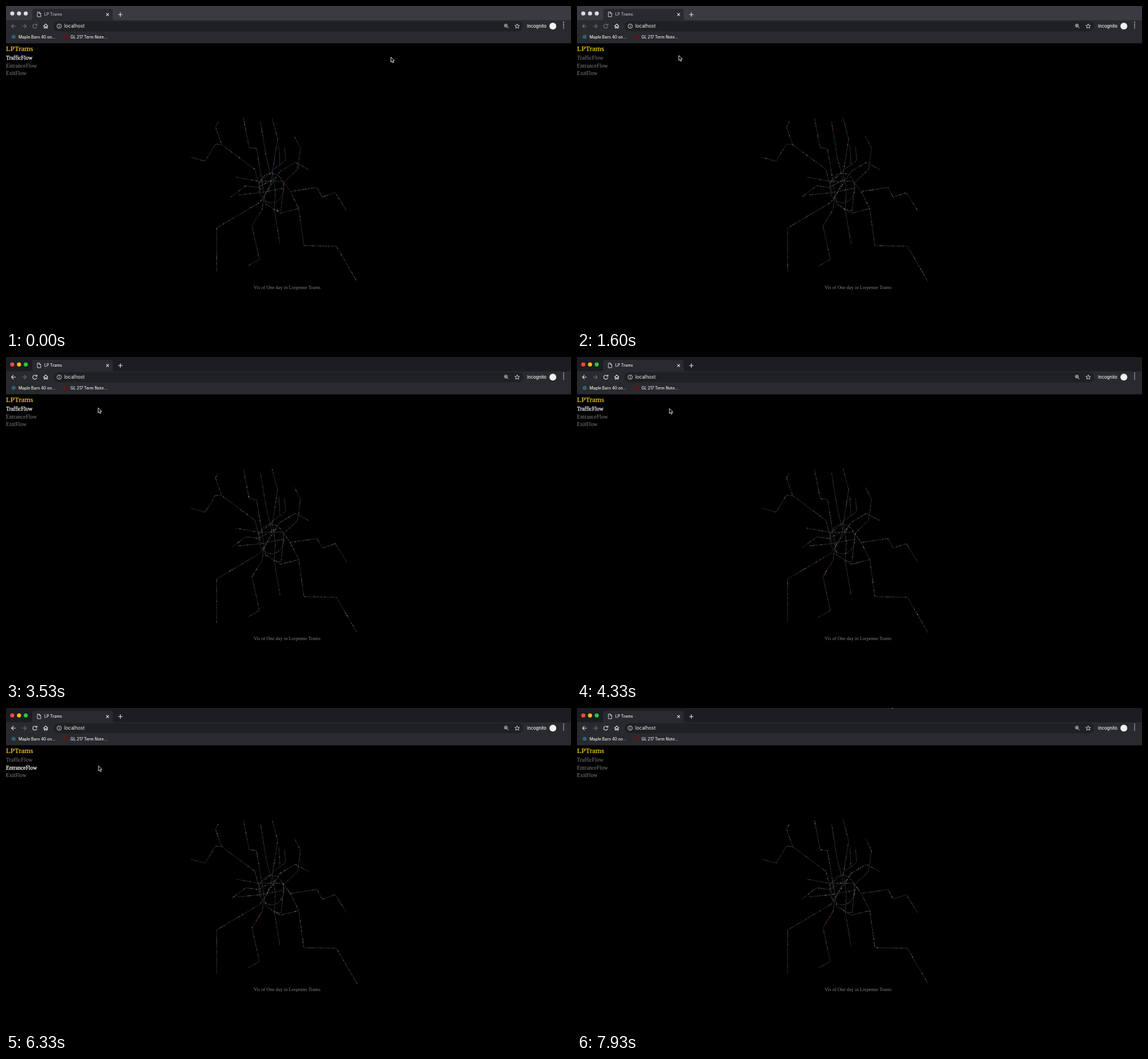
An HTML page with a canvas that plays this animation: 990x566 px, repeating every 8 s.

```html
<!DOCTYPE html>
<html lang="en">
<head>
<meta charset="utf-8">
<title>Metro traffic</title>
<style>
  html, body { margin: 0; width: 100%; height: 100%; overflow: hidden; background: #000; }
  canvas, svg { position: absolute; left: 0; top: 0; }
  svg { font-family: Inter, Roboto, sans-serif; font-weight: 500; fill: #f1f1f2; }
  .frame { fill: #393b40; }
  .active .frame { fill: #1c1d20; }
  .light { fill: #dcdcdd; }
  .active .red { fill: #fc4943; }
  .active .yellow { fill: #fdb424; }
  .active .green { fill: #2ac73f; }
  .icon { fill: none; stroke: #e8e8ea; stroke-width: 1.1; }
  .thin { stroke-width: .9; }
  .faint { stroke: #707277; }
  .waking { stroke: #77797e; }
  .active .waking { stroke: #e8e8ea; }
  .tabTitle { fill: #b8babe; }
  .active .tabTitle { fill: #f1f1f2; }
  .page { font-family: "Liberation Serif", "Times New Roman", serif; font-weight: 400; fill: #828282; }
  .brand { fill: #ffd61a; stroke: #ffd61a; stroke-width: .2; }
  .row.on { fill: #fff; stroke: #fff; stroke-width: .25; }
</style>
</head>
<body>
<canvas id="map" width="990" height="566"></canvas>
<svg id="window" width="990" height="566" viewBox="0 0 990 566">
  <rect class="frame" width="990" height="25"/>
  <path fill="#292a2e" d="M0 25H42Q46 25 46 21V9Q46 5 50 5H183Q187 5 187 9V21Q187 25 191 25H990V65.5H0Z"/>
  <rect x="83" y="26.5" width="823" height="18" rx="9" fill="#1e2023"/>

  <circle class="light red" cx="11" cy="13" r="3.6"/>
  <circle class="light yellow" cx="22.8" cy="13" r="3.6"/>
  <circle class="light green" cx="34.6" cy="13" r="3.6"/>

  <path class="icon thin" d="M55 10.7h3.5l2.3 2.3v5.8H55ZM58.3 10.9v2.4h2.4"/>
  <text class="tabTitle" x="67" y="17.3" font-size="7">LP Trams</text>
  <path class="icon" d="m175.7 12.7 4.6 4.6m0-4.6-4.6 4.6M196.7 15h7.4m-3.7-3.7v7.4"/>

  <path class="icon waking" d="M17 35.2H9.6m3.6-3.6-3.6 3.6 3.6 3.6"/>
  <path class="icon faint" d="M28 35.2h7.4m-3.6-3.6 3.6 3.6-3.6 3.6"/>
  <path class="icon waking" d="M53.3 33A3.6 3.6 0 1 0 54 36.2M54.2 31v2.8h-2.8"/>
  <path class="icon" d="m65.6 35.3 4-3.7 4 3.7M67 34.5v4.3h1.7v-2.6h1.9v2.6h1.7v-4.3"/>
  <circle class="icon thin" cx="93.2" cy="35.3" r="3.8"/>
  <path class="icon thin" d="M93.2 34.6v2.8m0-4.5v1"/>
  <text x="102" y="38.3" font-size="8.4" font-weight="400">localhost</text>

  <circle class="icon thin" cx="875.9" cy="34.3" r="2.6"/>
  <path class="icon thin" d="m877.8 36.2 2.7 2.7M874.6 34.3h2.6m-1.3-1.3v2.6"/>
  <path class="icon thin" d="m895.7 31.3 1.2 2.7 2.9.2-2.2 1.9.7 2.9-2.6-1.6-2.6 1.6.7-2.9-2.2-1.9 2.9-.2Z"/>
  <text x="913" y="38.1" font-size="7.6">Incognito</text>
  <circle cx="958.2" cy="35.2" r="6"/>
  <path class="icon" stroke-linecap="round" stroke-dasharray="0 3.4" style="stroke-width:1.8" d="M977 28.4v10.3"/>

  <circle cx="13.3" cy="54" r="3.5" fill="#2b6477"/>
  <text x="22" y="56.6" font-size="6.9">Maple Barn 40 on...</text>
  <rect x="100" y="51" width="7" height="6" fill="#641218"/>
  <text x="113" y="56.6" font-size="6.9">GL 217 Term Note...</text>

  <g class="page" font-size="9.7">
    <text class="brand" x="0" y="79" font-size="12.9">LPTrams</text>
    <text class="row" x="0" y="94">TrafficFlow</text>
    <text class="row" x="0" y="107.5">EntranceFlow</text>
    <text class="row" x="0" y="121">ExitFlow</text>
    <text x="434" y="495.7" font-size="8.43">Vis of One day in Lorpenne Trams</text>
  </g>
  <path id="cursor" fill="#000" stroke="#f4f4f4" stroke-width=".9" d="M0 0V8.7L2 6.9 3.4 10.1 4.9 9.4 3.5 6.3H6.2Z"/>
</svg>

<script>
const LOOP = 8000, STEP = LOOP / 120, WAKE = 2000;
const ctx = document.getElementById('map').getContext('2d');
const shell = document.getElementById('window');
const cursor = document.getElementById('cursor');
const rows = document.querySelectorAll('.row');
const RED = '#f04848', BLUE = '#6464f0', WHITE = '#d8d8d0', YELLOW = '#d8cc50';

let seed = 17;
const random = () => (seed = seed * 16807 % 2147483647) / 2147483647;
const mod = (a, n) => (a % n + n) % n;

const lines = [];

// tint is the share of trains in the line's own colour
function addLine(color, tint, points) {
  let length = 0;
  const legs = points.slice(1).map(([x, y], i) => {
    const [x0, y0] = points[i], size = Math.hypot(x - x0, y - y0);
    const leg = { x0, y0, dx: (x - x0) / size, dy: (y - y0) / size, start: length };
    length += size;
    return leg;
  });
  const trains = Array.from({ length: Math.round(length / 5) }, () => ({
    at: random() * length,
    speed: (random() < .5 ? -1 : 1) * (4 + random() * 6),
    color: random() < tint ? color : random() < .06 ? YELLOW : WHITE,
    glow: .12 + .55 * random() ** 2
  }));
  lines.push({ points, legs, length, trains });
}

// Suburban ends and main bends of each line
addLine(WHITE, .9, [[372, 203], [367, 212], [378, 243], [436, 286], [447, 327]]);
addLine(WHITE, .9, [[324, 265], [349, 272], [367, 242], [378, 243]]);
addLine(WHITE, .8, [[416, 196], [426, 248], [439, 250], [455, 347], [481, 363], [513, 355]]);
addLine(RED, .8, [[446, 203], [456, 265], [466, 305], [451, 338], [449, 356], [431, 385]]);
addLine(BLUE, .7, [[431, 385], [444, 444], [423, 456]]);
addLine(WHITE, .8, [[466, 195], [476, 233], [467, 290], [442, 310]]);
addLine(BLUE, .7, [[478, 244], [480, 278], [466, 288], [472, 325], [470, 357], [480, 416]]);
addLine(BLUE, .8, [[488, 247], [490, 270], [480, 279]]);
addLine(RED, .5, [[505, 228], [516, 249], [511, 286], [487, 309], [482, 359], [468, 357]]);
addLine(WHITE, .8, [[531, 287], [507, 274], [480, 290], [445, 344], [369, 389], [369, 466]]);
addLine(WHITE, .8, [[403, 300], [442, 307], [485, 307], [498, 325], [545, 318], [554, 335], [577, 327], [597, 359]]);
addLine(WHITE, .8, [[395, 334], [420, 315], [442, 318], [475, 300]]);
addLine(BLUE, .4, [[407, 331], [447, 327], [487, 319]]);
addLine(WHITE, .9, [[498, 325], [513, 355], [522, 420], [579, 421], [615, 483]]);

// Inner ring
addLine(RED, .35, Array.from({ length: 25 }, (_, i) => {
  const angle = i * Math.PI / 12;
  return [465 + 22 * Math.cos(angle), 319 + 26 * Math.sin(angle)];
}));

function drawMap(seconds) {
  ctx.clearRect(0, 0, 990, 566);
  ctx.strokeStyle = '#303030';
  ctx.lineWidth = .8;
  for (const { points, legs, length, trains } of lines) {
    ctx.globalAlpha = 1;
    ctx.beginPath();
    points.forEach(p => ctx.lineTo(...p));
    ctx.stroke();
    for (const train of trains) {
      const distance = mod(train.at + train.speed * seconds, length);
      const leg = legs.findLast(l => l.start <= distance);
      const along = distance - leg.start;
      ctx.globalAlpha = train.glow;
      ctx.fillStyle = train.color;
      ctx.fillRect(leg.x0 + leg.dx * along - .6, leg.y0 + leg.dy * along - .6, 1.2, 1.2);
    }
  }
}

// time, x, y of the pointer tip
const pointerKeys = [
  [0, 674.5, 89.5], [800, 216, 89.5], [2270, 149.5, 84.5], [3500, 161.5, 89],
  [5200, 162.5, 92], [6050, 162, 101.5], [7350, 162, 101.5], [7800, 535, 76],
  [7860, 549, -9.5], [LOOP, 549, -9.5]
];

function pointerAt(t) {
  const i = pointerKeys.findIndex(key => key[0] > t);
  const [t0, x0, y0] = pointerKeys[i - 1], [t1, x1, y1] = pointerKeys[i];
  const p = (t - t0) / (t1 - t0), ease = p * p * (3 - 2 * p);
  return [x0 + (x1 - x0) * ease, y0 + (y1 - y0) * ease];
}

function render(now) {
  const t = Math.floor(now % LOOP / STEP + 1e-6) * STEP % LOOP;
  const [x, y] = pointerAt(t);
  const ignored = t > 600 && t < WAKE;
  const hovered = ignored ? -1 : Math.floor((y - 84) / 13.5);
  rows.forEach((row, i) => row.classList.toggle('on', i === hovered));
  shell.classList.toggle('active', t >= WAKE);
  cursor.setAttribute('transform', `translate(${x} ${y})`);
  drawMap(t / 1000);
}

let start;
function tick(now) {
  start ??= now;
  render(now - start);
  requestAnimationFrame(tick);
}
render(0);
requestAnimationFrame(tick);
</script>
</body>
</html>
```
